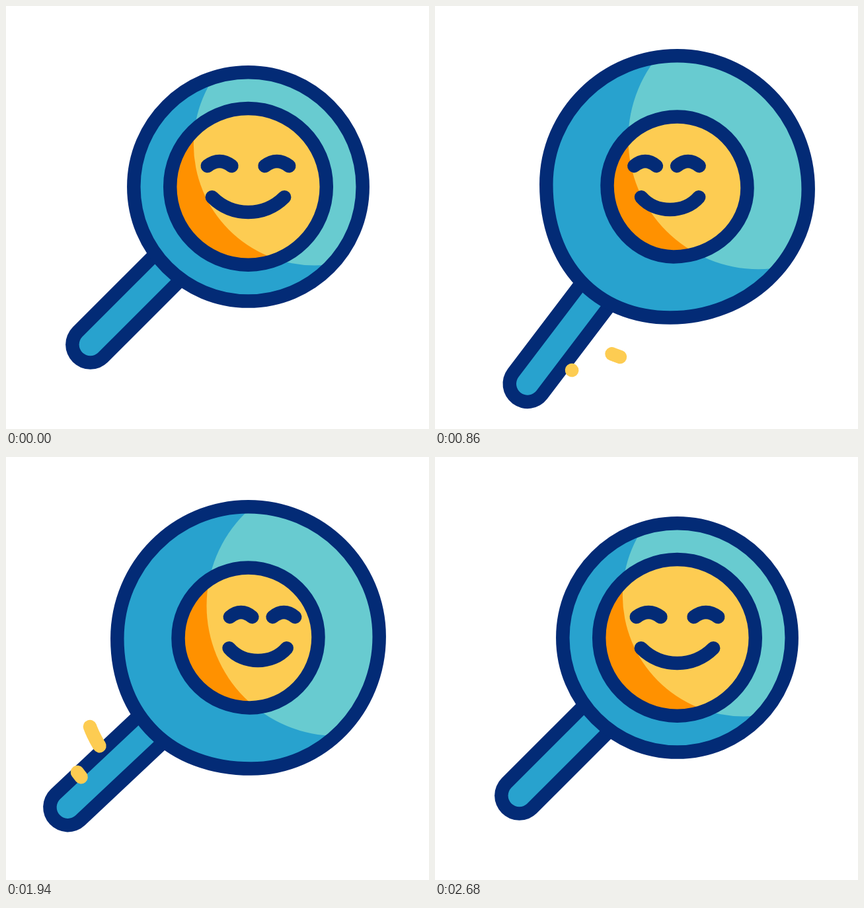
Write an HTML page with a canvas that moves like this. It is 640 by 640 pixels and loops after 3 s.

```html
<!DOCTYPE html>
<html lang="en">
<head>
<meta charset="utf-8">
<title>Smiling magnifier</title>
<style>
  html, body { margin: 0; width: 100%; height: 100%; overflow: hidden; background: #fff; }
  canvas { display: block; width: 640px; height: 640px; }
</style>
</head>
<body>
<canvas id="stage" width="640" height="640"></canvas>
<script>
const ctx = document.getElementById('stage').getContext('2d');
const LOOP = 3000, STEP = 20, CX = 366.5, CY = 273.4, LINE = 20.5;
const NAVY = '#032b76', BLUE = '#28a2ce', TEAL = '#68cbd0', YELLOW = '#fdcc52', ORANGE = '#ff9100';

const mix = (a, b, k) => a + (b - a) * k;
const rad = deg => deg * Math.PI / 180;
const progress = (t, from, to) => Math.min(1, Math.max(0, (t - from) / (to - from)));
const ease = (t, from, to) => {
  const x = progress(t, from, to);
  return x * x * (3 - 2 * x);
};

// Every part grows together at the start and returns by its own end time.
const held = (t, end) => ease(t, 0, 500) - ease(t, 2060, end);

// Swing down, drift a little, swing back past rest, settle.
const swing = t => 45 + 7.6 * ease(t, 310, 770) + 1.4 * ease(t, 760, 1200)
  - 11.8 * ease(t, 1580, 2020) + 2.8 * ease(t, 2120, 2680);

const gaze = t => mix(-16, 21.5, ease(t, 920, 1560));
const eyeOpening = t => 1 - .9 * Math.sin(Math.PI * progress(t, 2210, 2415)) ** 2;

function stroke(color, width) {
  ctx.strokeStyle = color;
  ctx.lineWidth = width;
  ctx.stroke();
}

function handle(angle, length) {
  ctx.beginPath();
  ctx.moveTo(CX, CY);
  ctx.lineTo(CX - length * Math.cos(angle), CY + length * Math.sin(angle));
  stroke(NAVY, 75);
  stroke(BLUE, 34);
}

// Ring whose side and bottom nodes slide, and whose lower left bulges, as the handle pulls on it.
function disc(r, pull, bulge, dark, bright, light) {
  const k = pull * r / 198;
  const nodes = [
    [CX, CY - r],
    [CX + r, CY + .55 * k],
    [CX - 1.55 * k, CY + r],
    [CX - r, CY - .5 * k]
  ];
  ctx.beginPath();
  ctx.moveTo(...nodes[0]);
  nodes.forEach(([x0, y0], i) => {
    const [x1, y1] = nodes[(i + 1) % 4];
    const c = .5523 + (i === 2 ? bulge : 0);
    const dx = (x1 - x0) * c, dy = (y1 - y0) * c;
    if (i % 2) ctx.bezierCurveTo(x0, y0 + dy, x1 - dx, y1, x1, y1);
    else ctx.bezierCurveTo(x0 + dx, y0, x1, y1 - dy, x1, y1);
  });
  ctx.closePath();
  ctx.fillStyle = dark;
  ctx.fill();

  const shine = new Path2D();
  shine.arc(light.x, light.y, light.r, 0, 2 * Math.PI);
  ctx.save();
  ctx.clip();
  ctx.fillStyle = bright;
  ctx.fill(shine);
  ctx.restore();
  stroke(NAVY, LINE);
}

function eye(x, half, opening) {
  ctx.save();
  ctx.translate(x, 238.5);
  ctx.scale(1, opening);
  ctx.beginPath();
  ctx.moveTo(-half, 3.5);
  ctx.quadraticCurveTo(0, -10.5, half, 3.5);
  stroke(NAVY, LINE);
  ctx.restore();
}

function mouth(x, half, sag, roundness) {
  const y = 289.3, dip = y + sag / .75, inset = half * (1 - roundness);
  ctx.beginPath();
  ctx.moveTo(x - half, y);
  ctx.bezierCurveTo(x - inset, dip, x + inset, dip, x + half, y);
  stroke(NAVY, LINE);
}

function face(t, focus) {
  const shift = gaze(t) * focus;
  const gap = mix(43.4, 32.4, focus), half = mix(18.3, 16.8, focus);
  for (const side of [-1, 1]) eye(CX + shift + side * gap, half, eyeOpening(t));
  mouth(CX + shift * .68, mix(54.7, 43.6, focus), mix(22.7, 18.8, focus), mix(.56, .5, focus));
}

// A curve that is drawn from its start, then erased from its start.
function trail(t, fadeIn, start, [x0, y0, x1, y1, x2, y2]) {
  if (t <= fadeIn || t >= start + 480) return;
  const tail = ease(t, start + 170, start + 410);
  const head = Math.max(tail + .001, ease(t, start, start + 200));
  ctx.globalAlpha = progress(t, fadeIn, fadeIn + 70);
  ctx.beginPath();
  for (let i = 0; i <= 24; i++) {
    const s = mix(tail, head, i / 24);
    ctx.lineTo(mix(mix(x0, x1, s), mix(x1, x2, s), s), mix(mix(y0, y1, s), mix(y1, y2, s), s));
  }
  stroke(YELLOW, LINE);
  ctx.globalAlpha = 1;
}

function draw(t) {
  ctx.fillStyle = '#fff';
  ctx.fillRect(0, 0, 640, 640);
  ctx.lineCap = ctx.lineJoin = 'round';

  const angle = swing(t), grow = held(t, 2480), focus = held(t, 2430);
  const pull = (angle - 46) * grow, bulge = .045 * grow;
  const lightAngle = rad(-27 - 1.1 * (angle - 49.7) - 10.7 * (1 - held(t, 2680)));
  const distance = mix(119, 142.5, grow);
  const light = {
    x: CX + distance * Math.cos(lightAngle),
    y: CY + distance * Math.sin(lightAngle),
    r: mix(183, 197, grow)
  };

  handle(rad(angle), mix(337.8, 374.5, held(t, 2600)));
  disc(mix(173.2, 198.2, grow), pull, bulge, BLUE, TEAL, light);
  disc(mix(118.3, 106, focus), pull, 0, ORANGE, YELLOW, light);
  face(t, focus);

  trail(t, 410, 420, [116, 424, 133, 513, 207, 551]);
  trail(t, 410, 490, [167, 427, 193, 501, 280, 531]);
  trail(t, 1600, 1562, [248, 565, 165, 553, 108, 477]);
  trail(t, 1600, 1605, [231, 513, 152, 474, 127, 408]);
}

function tick() {
  draw(Math.floor(performance.now() % LOOP / STEP) * STEP);
  requestAnimationFrame(tick);
}
tick();
</script>
</body>
</html>
```
